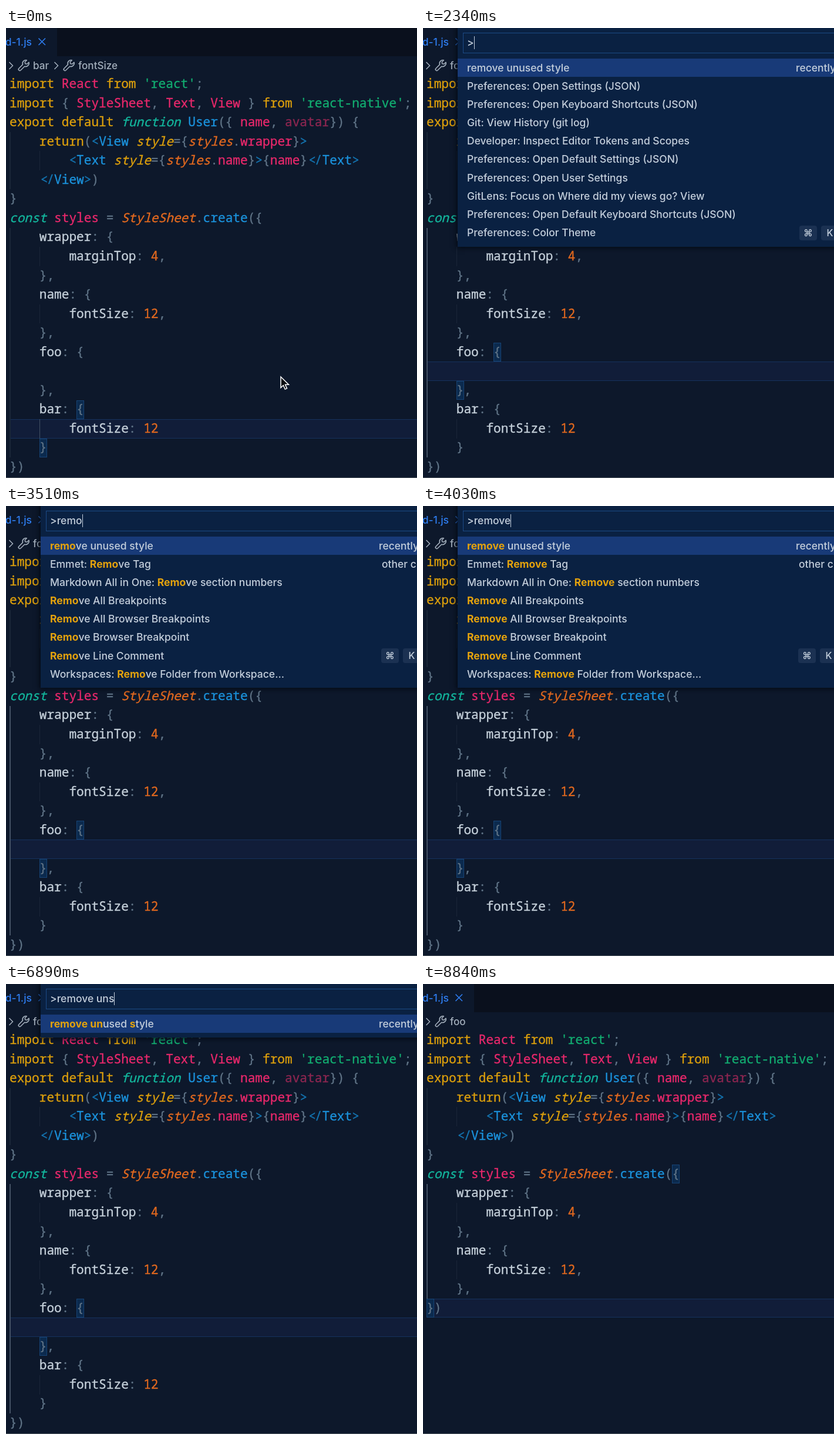
An HTML page that plays this animation: 700x765 px, repeating every 8.97 s.

```html
<!DOCTYPE html>
<html lang="en">
<head>
<meta charset="utf-8">
<title>Remove unused styles</title>
<style>
html, body { margin: 0; width: 100%; height: 100%; overflow: hidden; background: #0d182b; }
#stage { position: relative; width: 700px; height: 765px; overflow: hidden; font: 500 17.5px Inter, sans-serif; color: #c3cedb; }
#stage * { position: absolute; box-sizing: border-box; white-space: pre; }
#stage span, #stage b { position: static; }
.tabs { left: 87px; top: 0; width: 613px; height: 48px; background: #0a101d; }
.tab { right: 656px; top: 12px; line-height: 24px; color: #2e7df0; }
.crumb { top: 52px; line-height: 24px; font-size: 17.1px; color: #a3afbc; }
svg { left: 0; top: 0; fill: none; }
.code { left: 6px; height: 32.55px; font: 500 21.13px/32.55px "Noto Sans Mono", monospace; font-variant-ligatures: none; -webkit-text-stroke: .35px; }
.guide { width: 1.5px; background: #1a2638; }
.guide.active { background: #435164; }
.current { left: 6px; width: 710px; height: 32.55px; background: #111d39; border: 1.5px solid #15315c; }
.bracket { width: 13px; height: 32px; background: #0b2a4e; border: 1px solid #174476; }
.edge { left: 0; top: 764px; width: 700px; height: 1px; background: #4a545c; }
.y { color: #dc9f0c; } .p { color: #e8286b; } .g { color: #12ac70; } .d { color: #5f7386; }
.b { color: #1b92dc; } .n, .l { color: #1474b0; } .m { color: #8c2650; } .w { color: #c6d1db; } .o { color: #e2691f; }
.T { color: #13b59c; font-style: italic; } .O { color: #e2691f; font-style: italic; } .Y { color: #dc9f0c; font-style: italic; }
.l { letter-spacing: -2px; padding: 0 2px; }
#palette { left: 59px; top: -10px; width: 720px; background: #0a2142; box-shadow: 0 0 8px 2px #040a14; }
.input { left: 9px; top: 18px; width: 720px; height: 34.5px; padding-left: 6px; line-height: 31px; border: 1.5px solid #1c4a86; }
.input i { display: inline-block; position: static !important; width: 1px; height: 22px; background: #c3cedb; vertical-align: -5px; }
.row { left: 0; width: 720px; height: 31.15px; line-height: 31.15px; padding-left: 16px; }
.row.first { background: #183a78; }
.row b { color: #e3a20d; font-weight: 700; }
.row em { font-style: normal; top: 0; }
.row kbd { top: 3.5px; width: 30px; height: 25px; border-radius: 4px; background: #1b3152; font: 500 16px/25px Inter, "DejaVu Sans", sans-serif; text-align: center; }
</style>
</head>
<body>
<div id="stage"></div>
<script>
const LOOP = 8970, TICK = 130;
const LEFT = 6, TOP = 79.2, CHAR = 12.68, LINE = 32.55, ROW = 31.15;

// Segments are split by "~"; the first letter of each names its colour class.
const CODE = [
  "yimport ~pReact ~yfrom ~g'react'~d;",
  "yimport ~d{ ~pStyleSheet~d, ~pText~d, ~pView~d } ~yfrom ~g'react-native'~d;",
  "yexport default ~Tfunction ~bUser~d({ ~pname~d, ~mavatar~d}) {",
  "y    return~d(~n<~bView ~Ystyle~d={~Ostyles~d.~pwrapper~d}~n>",
  "d        ~n<~bText ~Ystyle~d={~Ostyles~d.~pname~d}~n>~d{~pname~d}~l</~bText~n>",
  "d    ~l</~bView~n>~d)",
  "d}",
  "Tconst ~pstyles ~d= ~OStyleSheet~d.~bcreate~d({",
  "w    wrapper~d: {",
  "w        marginTop~d: ~o4~d,",
  "d    },",
  "w    name~d: {",
  "w        fontSize~d: ~o12~d,",
  "d    },",
  "w    foo~d: {",
  "d",
  "d    },",
  "w    bar~d: {",
  "w        fontSize~d: ~o12",
  "d    }",
  "d})"
];
const CLEANED = [...CODE.slice(0, 14), "d})"];

const unused = { text: "remove unused style", group: "recently used", groupX: 576 };
const RECENT = [
  unused,
  { text: "Preferences: Open Settings (JSON)" },
  { text: "Preferences: Open Keyboard Shortcuts (JSON)" },
  { text: "Git: View History (git log)" },
  { text: "Developer: Inspect Editor Tokens and Scopes" },
  { text: "Preferences: Open Default Settings (JSON)" },
  { text: "Preferences: Open User Settings" },
  { text: "GitLens: Focus on Where did my views go? View" },
  { text: "Preferences: Open Default Keyboard Shortcuts (JSON)" },
  { text: "Preferences: Color Theme", keysX: 582 }
];
const REMOVERS = [
  unused,
  { text: "Emmet: Remove Tag", group: "other commands", groupX: 581 },
  { text: "Markdown All in One: Remove section numbers" },
  { text: "Remove All Breakpoints" },
  { text: "Remove All Browser Breakpoints" },
  { text: "Remove Browser Breakpoint" },
  { text: "Remove Line Comment", keysX: 580 },
  { text: "Workspaces: Remove Folder from Workspace..." }
];

// Each step overrides part of the state before it.
const STEPS = [
  [0, { code: CODE, line: 18, brackets: [[17, 9], [19, 4]], active: [4, 18, 18],
        crumbs: ["bar", "fontSize"], pointer: "arrow", query: null }],
  [260, { pointer: "beam" }],
  [780, { line: 15, brackets: [[14, 9], [16, 4]], active: [0, 8, 19] }],
  [910, { crumbs: ["foo"] }],
  [1820, { query: "", pointer: null }],
  [2730, { query: "r" }],
  [3250, { query: "re" }],
  [3380, { query: "rem" }],
  [3510, { query: "remo" }],
  [3770, { query: "remov" }],
  [3900, { query: "remove" }],
  [4550, { query: "remove " }],
  [4680, { query: "remove u" }],
  [5850, { query: "remove un" }],
  [6240, { query: "remove uns" }],
  [7150, { query: null }],
  [7280, { code: CLEANED, line: 14, brackets: [], active: [0, 8, 13] }],
  [7410, { brackets: [[7, 33], [14, 0]] }]
];

const escape = s => s.replace(/&/g, "&amp;").replace(/</g, "&lt;");
const lineY = n => TOP + n * LINE;
const colX = n => LEFT + n * CHAR;

function codeLine(source, n) {
  const spans = source.split("~").map(s => `<span class="${s[0]}">${escape(s.slice(1))}</span>`);
  return `<div class="code" style="top:${lineY(n) - 1.2}px">${spans.join("")}</div>`;
}

function guide(col, from, to, active = "") {
  return `<div class="guide ${active}" style="left:${colX(col)}px;top:${lineY(from)}px;height:${(to - from + 1) * LINE}px"></div>`;
}

function guides({ code, active }) {
  const inner = [4, 9, 12, 18].filter(n => n < code.length);
  return guide(0, 3, 5) + guide(0, 8, code.length - 2) +
    inner.map(n => guide(4, n, n)).join("") + guide(...active, "active");
}

function breadcrumbs(names) {
  const marks = names.map((_, i) => {
    const x = i * 77;
    return `<path d="M${x + 5.5} 58l6 6-6 6" stroke-width="1.5"/>
      <path transform="translate(${x + 19.5} 52.5) scale(1.36)" stroke-width="1.15" stroke-linejoin="round"
        d="M14.3 4.2 12 6.4 9.7 6.1 9.4 3.9 11.6 1.6A4.2 4.2 0 0 0 6.6 7.1L1.8 11.9A1.6 1.6 0 0 0 4.1 14.2L9 9.4A4.2 4.2 0 0 0 14.3 4.2Z"/>`;
  });
  const labels = names.map((name, i) => `<div class="crumb" style="left:${46 + i * 77}px">${name}</div>`);
  return `<svg width="700" height="80" stroke="#a3afbc">${marks.join("")}
    <path d="M55.5 17.5l11.5 11.5m0-11.5l-11.5 11.5" stroke="#2e7df0" stroke-width="1.6"/></svg>` + labels.join("");
}

function highlight(text, query) {
  const bold = (s, at, n) => `${s.slice(0, at)}<b>${s.slice(at, at + n)}</b>${s.slice(at + n)}`;
  if (!query) return text;
  const at = text.toLowerCase().indexOf(query);
  if (at >= 0) return bold(text, at, query.length);
  // The last letter may match the start of a later word.
  const head = query.slice(0, -1);
  return bold(bold(text, text.lastIndexOf(query.at(-1)), 1), text.indexOf(head), head.length);
}

function palette(query) {
  if (query === null) return "";
  const list = query.length < 3 ? RECENT : REMOVERS;
  const items = list.filter(item => item === unused || item.text.toLowerCase().includes(query));
  const rows = items.map((item, i) => {
    const group = item.group ? `<em style="left:${item.groupX}px">${item.group}</em>` : "";
    const keys = item.keysX
      ? ["⌘", "K"].map((k, j) => `<kbd style="left:${item.keysX + j * 37}px">${k}</kbd>`).join("") : "";
    return `<div class="row ${i ? "" : "first"}" style="top:${61.7 + i * ROW}px"><span>${highlight(item.text, query)}</span>${group}${keys}</div>`;
  });
  return `<div id="palette" style="height:${70 + items.length * ROW}px">
    <div class="input">&gt;${query}<i></i></div>${rows.join("")}</div>`;
}

const POINTERS = {
  arrow: `<path d="M1 1v18.5l4.3-4 3 6.6 3.2-1.4-3-6.5h6z" fill="#080b10" stroke="#fff" stroke-width="1.5"/>`,
  beam: `<path d="M-4-9.5q4 0 4 3v13q0 3-4 3M4-9.5q-4 0-4 3v13q0 3 4 3M-2.5 2h5" stroke="#e4e8ee" stroke-width="1.6"/>`
};

function view(state) {
  const brackets = state.brackets.map(([n, col]) =>
    `<div class="bracket" style="left:${colX(col)}px;top:${lineY(n)}px"></div>`);
  return `<div class="tabs"></div><div class="tab">d-1.js</div>` + breadcrumbs(state.crumbs) +
    `<div class="current" style="top:${lineY(state.line)}px"></div>` +
    guides(state) + brackets.join("") + state.code.map(codeLine).join("") +
    `<div class="edge"></div>` + palette(state.query) +
    (state.pointer ? `<svg id="pointer" width="20" height="26" overflow="visible">${POINTERS[state.pointer]}</svg>` : "");
}

const stage = document.getElementById("stage");
let shown = -1;

function draw(now) {
  const t = Math.floor((now % LOOP) / TICK) * TICK;
  const step = STEPS.findLastIndex(([at]) => at <= t);
  if (step !== shown) {
    stage.innerHTML = view(Object.assign({}, ...STEPS.slice(0, step + 1).map(s => s[1])));
    shown = step;
  }
  const pointer = document.getElementById("pointer");
  if (pointer) {
    const k = Math.min(1, Math.max(0, (t - 130) / 520));
    const ease = k * k * (3 - 2 * k);
    pointer.style.transform = `translate(${467 - 21 * ease}px, ${592 + 3 * ease}px)`;
  }
}

const start = performance.now();
function tick() {
  draw(performance.now() - start);
  requestAnimationFrame(tick);
}
tick();
</script>
</body>
</html>
```
